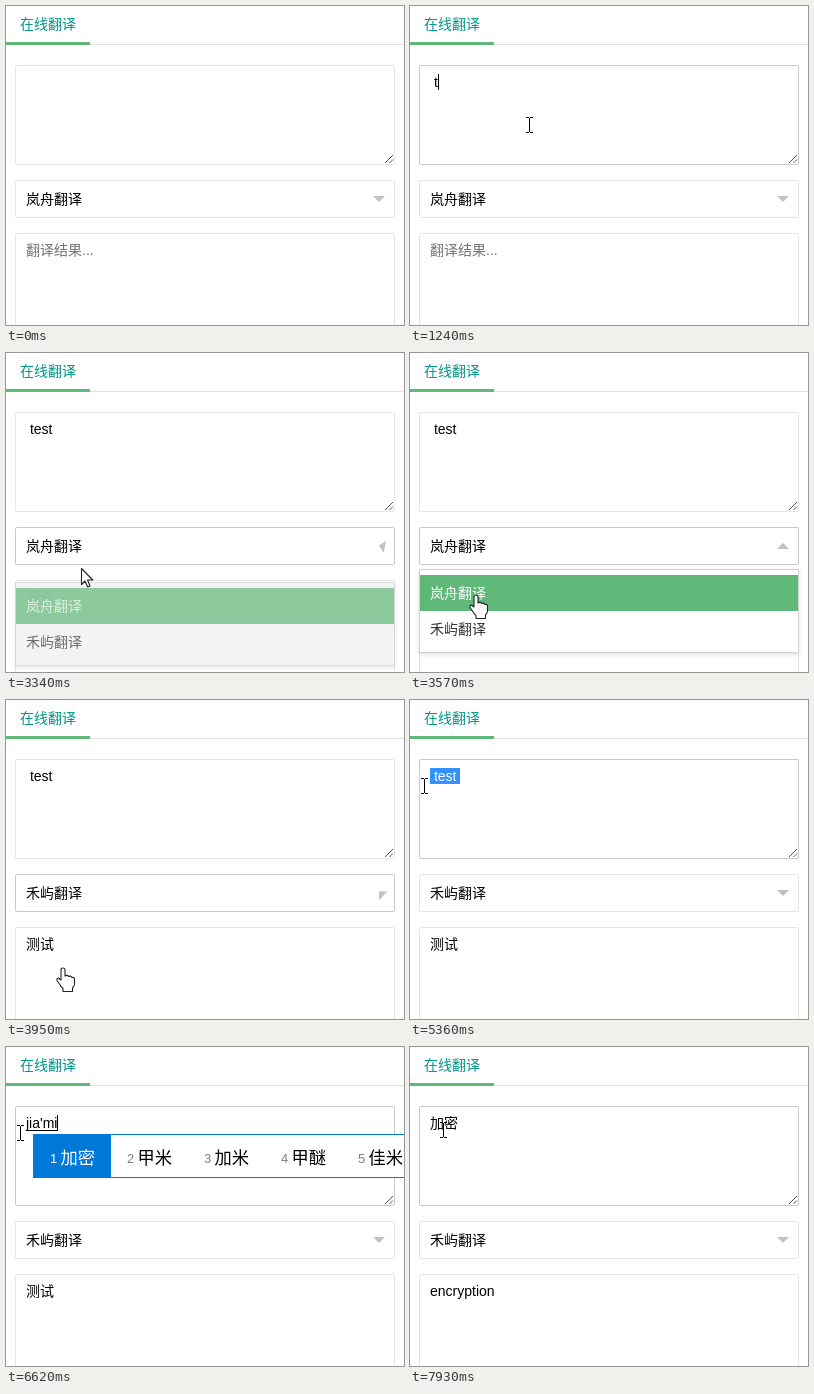
These frames come from a looping animation (398x319 px, 7.99 s). An HTML page with a canvas:

```html
<!DOCTYPE html>
<html lang="zh-CN">
<head>
<meta charset="utf-8">
<title>在线翻译</title>
<style>
html, body { margin: 0; width: 100%; height: 100%; overflow: hidden; background: #fff; }
canvas { display: block; }
</style>
</head>
<body>
<canvas id="stage" width="398" height="319"></canvas>
<script>
const ctx = document.getElementById('stage').getContext('2d');
const LOOP = 7990, TICK = 77.7;
const FAMILY = '"Liberation Sans", "Noto Sans CJK SC", "Noto Sans CJK", sans-serif';
const ENGINES = ['岚舟翻译', '禾屿翻译'];
const GREEN = '#5fb878', BLUE = '#0078d7';

// [time, text] of the input; each change restarts the caret blink
const TYPING = [
  [0, ' '], [770, ' '], [1240, ' t'], [1320, ' te'], [1550, ' tes'], [1730, ' test'], [2160, ' test '],
  [6060, 'j'], [6210, 'ji'], [6300, 'jia'], [6470, "jia'm"], [6620, "jia'mi"],
  [6930, '加密'], [7240, '加密 ']
];
const RESULTS = [[0, ''], [2390, '测试'], [7300, 'encryption']];
const CANDIDATES = {
  ji: [27, '及 几 级 即 机 记 季'],
  jia: [27, '加 家 假 价 甲 佳 架'],
  "jia'm": [-1, '加密 家门 加盟 加码 家母 加满 甲米'],
  "jia'mi": [27, '加密 甲米 加米 甲醚 佳米 假秘 家蜜']
};

// [first step, last step, step count, x, y]: hops from the previous point
const MOVES = [
  [70, 70, 1, 235, 233], [150, 620, 7, 120, 119], [770, 770, 1, 126, 122], [850, 920, 2, 119, 119],
  [2710, 2940, 4, 78, 199], [3110, 3340, 4, 75, 215], [3410, 3800, 6, 57, 268],
  [4030, 4430, 6, 80, 93], [4580, 4730, 3, 26, 93],
  [5130, 5130, 1, 2, 84], [5210, 5210, 1, 13, 86], [5360, 5360, 1, 14, 86], [7760, 7930, 3, 33, 83]
];

const clamp = v => Math.max(0, Math.min(1, v));
const easeOut = (t, start) => 1 - (1 - clamp((t - start) / 300)) ** 2.3;
const within = (t, a, b) => t >= a && t < b;
const latest = (list, t) => list.filter(item => item[0] <= t).pop();

function rect(x, y, w, h, color) {
  ctx.fillStyle = color;
  ctx.fillRect(x, y, w, h);
}

function text(str, x, y, color = '#000', size = 14) {
  ctx.font = size + 'px ' + FAMILY;
  ctx.fillStyle = color;
  ctx.fillText(str, x, y);
}

function widthOf(str) {
  ctx.font = '14px ' + FAMILY;
  return ctx.measureText(str).width;
}

function box(y, h, focus) {
  const level = Math.round(230 - 29 * focus);
  ctx.strokeStyle = `rgb(${level},${level},${level})`;
  ctx.lineWidth = 1;
  ctx.beginPath();
  ctx.roundRect(9.5, y + .5, 379, h - 1, 1.5);
  ctx.stroke();
}

function shape(path, x, y) {
  const p = new Path2D(path);
  ctx.save();
  ctx.translate(x, y);
  ctx.fillStyle = '#fff';
  ctx.fill(p);
  ctx.strokeStyle = '#1c2628';
  ctx.lineWidth = 1.1;
  ctx.lineJoin = 'round';
  ctx.stroke(p);
  ctx.restore();
}

function pointerAt(t) {
  let [x, y] = [235, 233];
  for (const [start, end, steps, tx, ty] of MOVES) {
    if (t < start) break;
    const gap = (end - start) / (steps - 1 || 1) || 1;
    const done = Math.min(steps, Math.floor((t - start + 5) / gap) + 1) / steps;
    x += (tx - x) * done;
    y += (ty - y) * done;
  }
  return [Math.round(x), Math.round(y)];
}

function drawPointer(t, x, y) {
  if (t < 70 || within(t, 1320, 2710) || within(t, 4810, 5130)) return;
  const overList = within(t, 3410, 4030) && y >= 216;
  const overSelect = y >= 174 && y < 212;
  const overText = x >= 9 && (within(y, 59, 159) || y >= 227);
  if (overList || overSelect) {
    shape('M-2 12V2Q-2 0 0 0Q2 0 2 2V8Q4 6.5 6 8.5Q8 7.5 9 9.5Q11.5 9 11.5 11.5V16Q11.5 18 9.5 20V23.5H0V20.5Q-2 19-3.5 16L-6 12.5Q-6.5 10.5-4.5 10Z', x, y);
  } else if (overText) {
    rect(x, y - 7, 1, 14, '#000');
    for (const end of [y - 8, y + 7]) {
      rect(x - 3, end, 3, 1, '#000');
      rect(x + 1, end, 3, 1, '#000');
    }
  } else {
    shape('M.5.5V16.5L4 13L6.7 19L9 18L6.5 12H11.8Z', x, y);
  }
}

function drawInput(t, pointerX) {
  const [since, value] = latest(TYPING, t);
  const end = Math.round(20 + widthOf(value));
  text(value, 20, 81);
  if (within(t, 6060, 6930)) rect(20, 83, end - 20, 1, '#000');
  if (within(t, 4580, 6060)) {
    const left = t < 4810 ? Math.max(20, Math.min(50, pointerX)) : 20;
    ctx.save();
    ctx.beginPath();
    ctx.rect(left, 68, 50 - left, 16);
    ctx.clip();
    rect(20, 68, 30, 16, '#3390ff');
    text(value, 20, 81, '#fff');
    ctx.restore();
  }
  if (t >= 770 && t - since < 550) rect(end, 68, 1, 16, '#000');
}

function drawArrow(tick) {
  const turn = tick < 3927 ? easeOut(tick, 3250) : 1 - easeOut(tick, 3927);
  ctx.save();
  ctx.translate(373, 196 - 6 * turn);
  ctx.rotate(Math.PI * turn);
  ctx.fillStyle = '#c2c2c2';
  ctx.fill(new Path2D('M-6-6H6L0 0Z'));
  ctx.restore();
}

function drawList(tick, pointerY) {
  const shown = easeOut(tick, 3250);
  ctx.save();
  ctx.globalAlpha = .3 + .7 * shown;
  ctx.translate(0, 216 + 30 * (1 - shown));
  ctx.save();
  ctx.shadowColor = 'rgba(0,0,0,.12)';
  ctx.shadowBlur = 4;
  ctx.shadowOffsetY = 2;
  rect(9, 0, 380, 84, '#d2d2d2');
  ctx.restore();
  rect(10, 1, 378, 82, '#fff');
  rect(10, 6, 378, 36, GREEN);
  if (pointerY >= 258) rect(10, 42, 378, 36, '#f2f2f2');
  text(ENGINES[0], 20, 29, '#fff');
  text(ENGINES[1], 20, 65, '#333');
  ctx.restore();
}

function drawCandidates(t) {
  const entry = within(t, 6210, 6930) && CANDIDATES[latest(TYPING, t)[1]];
  if (!entry) return;
  const [left, words] = entry;
  const list = words.split(' ');
  const cell = list[0].length > 1 ? 77 : 60;
  const width = cell * list.length + 2;
  rect(left, 87, width, 44, BLUE);
  rect(left + 1, 88, width - 2, 42, '#fff');
  rect(left, 87, cell + 1, 44, BLUE);
  list.forEach((word, i) => {
    const x = left + 17 + i * cell;
    text(i + 1, x, 115.5, i ? '#808080' : '#fff', 13);
    text(word, x + 10.5, 116.5, i ? '#000' : '#fff', 17.3);
  });
}

function draw(t) {
  const tick = Math.floor((t + 14) / TICK) * TICK;
  const [px, py] = pointerAt(t);
  const fade = (on, off) => easeOut(tick, on) - easeOut(tick, off);

  rect(0, 0, 398, 319, '#fff');
  rect(0, 38, 398, 1, '#e2e2e2');
  rect(0, 36, 84, 3, GREEN);
  text('在线翻译', 14, 23, '#009688');

  box(59, 100, fade(470, 3000) + fade(4350, 9000));
  ctx.strokeStyle = '#555';
  ctx.beginPath();
  ctx.moveTo(379, 157); ctx.lineTo(387, 149);
  ctx.moveTo(383.5, 157); ctx.lineTo(387, 153.5);
  ctx.stroke();
  drawInput(t, px);

  box(174, 38, fade(2900, 4350));
  text(ENGINES[t < 3950 ? 0 : 1], 20, 198);
  drawArrow(tick);

  box(227, 100, 0);
  const result = latest(RESULTS, t)[1];
  text(result || '翻译结果...', 20, 249, result ? '#000' : '#757575');

  if (within(t, 3330, 3950)) drawList(tick, py);
  drawCandidates(t);
  drawPointer(t, px, py);
}

const began = performance.now();
function frame() {
  draw((performance.now() - began) % LOOP);
  requestAnimationFrame(frame);
}
frame();
</script>
</body>
</html>
```
